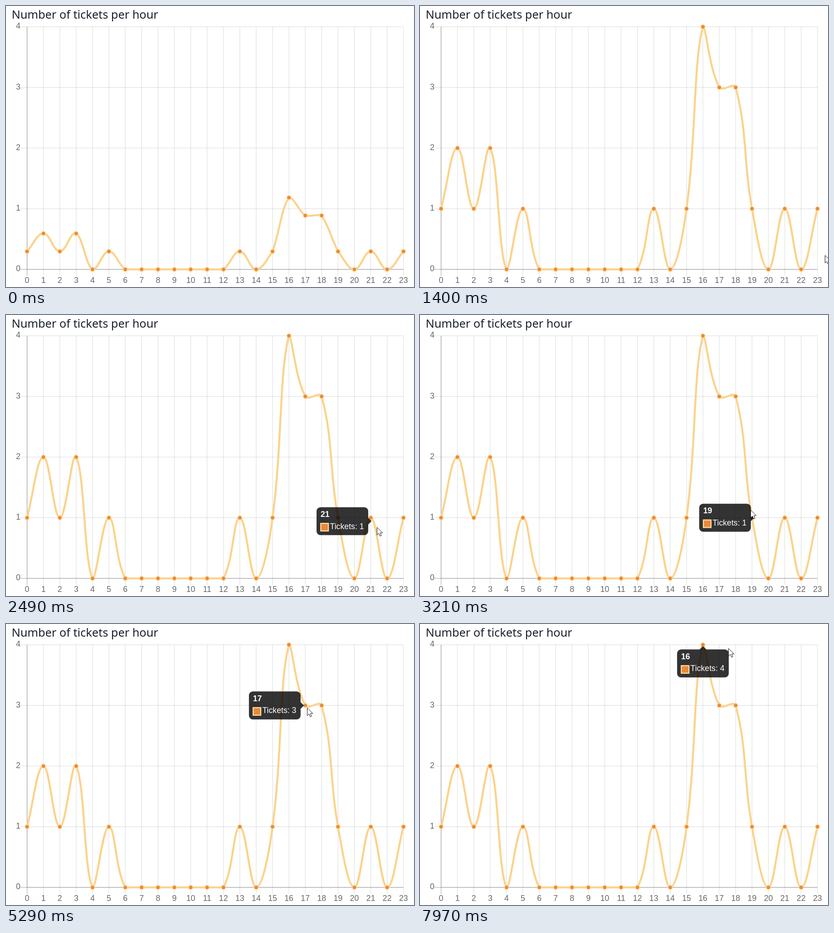
An HTML page with a canvas for the animation above (8 s loop, 900 by 622 pixels).

```html
<!DOCTYPE html>
<html lang="en">
<head>
<meta charset="utf-8">
<title>Tickets per hour</title>
<style>
  html, body { margin: 0; width: 100%; height: 100%; overflow: hidden; background: #fff; }
  canvas { display: block; }
</style>
</head>
<body>
<canvas id="stage" width="900" height="622"></canvas>
<script>
const ctx = document.getElementById('stage').getContext('2d');
const LOOP = 8000;
const UNIT = 1.475;               // one chart pixel on the stage
const FONT = 12 * UNIT;
const SANS = '"Liberation Sans", Arial, sans-serif';
const LINE = '#fbd38d', DOT = '#ed8936';

const values = [1, 2, 1, 2, 0, 1, 0, 0, 0, 0, 0, 0, 0, 1, 0, 1, 4, 3, 3, 1, 0, 1, 0, 1];
const LEFT = 46.5, TOP = 46, STEP = 36.1, BOTTOM = 583, ROW = (BOTTOM - TOP) / 4;
const RIGHT = LEFT + 23 * STEP;
const points = values.map((v, i) => ({ x: LEFT + i * STEP, y: BOTTOM - v * ROW }));

const clamp = (v, lo, hi) => Math.min(hi, Math.max(lo, v));
const lerp = (a, b, k) => a + (b - a) * k;
const easeOutQuart = p => 1 - (1 - clamp(p, 0, 1)) ** 4;

// Control points of a spline with tension 0.4, kept inside the plot.
function handles(pts) {
  return pts.map((p, i) => {
    const prev = pts[Math.max(0, i - 1)], next = pts[Math.min(pts.length - 1, i + 1)];
    const before = Math.hypot(p.x - prev.x, p.y - prev.y);
    const after = Math.hypot(next.x - p.x, next.y - p.y);
    const at = k => ({
      x: clamp(p.x + k * (next.x - prev.x), LEFT, RIGHT),
      y: clamp(p.y + k * (next.y - prev.y), TOP, BOTTOM)
    });
    return { into: at(-0.4 * before / (before + after)), out: at(0.4 * after / (before + after)) };
  });
}
const flatHandles = handles(points.map(p => ({ x: p.x, y: BOTTOM })));
const fullHandles = handles(points);

// Tooltip stops: start time, hovered hour, side on which the arrow sits.
const BOX_W = 114, BOX_H = 42 * UNIT, GAP = 7 * UNIT, CARET = 5 * UNIT, RADIUS = 6 * UNIT;
const stops = [
  [1410, 22, 'bottom'], [2305, 21, 'right'], [3040, 19, 'right'],
  [3810, 18, 'right'], [4480, 17, 'right'], [5610, 16, 'top']
].map(([start, hour, side]) => {
  const p = points[hour];
  const place = {
    bottom: [p.x - BOX_W + 8 * UNIT, p.y - BOX_H - GAP],
    right: [p.x - BOX_W - GAP, p.y - BOX_H / 2],
    top: [p.x - BOX_W / 2, p.y + GAP]
  }[side];
  return { start, hour, side, x: place[0], y: place[1] };
});

// Pointer path: time, x, y.
const path = [
  [1400, 893, 552], [1850, 860, 520], [2130, 860, 520], [2305, 850, 508], [2490, 818, 470],
  [2570, 812, 465], [2920, 795, 455], [3040, 768, 446], [3210, 729, 432], [3290, 724, 415],
  [3730, 712, 331], [3790, 710, 318], [4240, 693, 205], [4480, 678, 194], [4550, 664, 186],
  [5290, 664, 186], [5610, 642, 112], [5900, 628, 57.5], [7700, 628, 57.5], [7970, 680, 54]
];

function text(str, x, y, align, color, weight = '') {
  ctx.font = `${weight} ${FONT}px ${SANS}`;
  ctx.textAlign = align;
  ctx.textBaseline = 'middle';
  ctx.fillStyle = color;
  ctx.fillText(str, x, y);
}

function segment(x1, y1, x2, y2, alpha) {
  ctx.strokeStyle = `rgba(0,0,0,${alpha})`;
  ctx.lineWidth = UNIT;
  ctx.beginPath();
  ctx.moveTo(x1, y1);
  ctx.lineTo(x2, y2);
  ctx.stroke();
}

function drawGrid() {
  ctx.font = '500 25.3px "Noto Sans", "Open Sans", sans-serif';
  ctx.textAlign = 'left';
  ctx.textBaseline = 'alphabetic';
  ctx.fillStyle = '#1a202c';
  ctx.fillText('Number of tickets per hour', 12.5, 28);

  const tick = 10 * UNIT;
  points.forEach((p, i) => {
    segment(p.x, TOP, p.x, BOTTOM + tick, i ? 0.1 : 0.25);
    text(i, p.x, 607.8, 'center', '#666');
  });
  for (let v = 0; v <= 4; v++) {
    const y = BOTTOM - v * ROW;
    segment(LEFT - tick, y, RIGHT, y, v ? 0.1 : 0.25);
    text(v, LEFT - tick, y - 0.5, 'right', '#666');
  }
  segment(LEFT, TOP, LEFT, BOTTOM, 0.1);
  segment(LEFT, BOTTOM, RIGHT, BOTTOM, 0.1);
}

function drawSeries(t) {
  const grow = easeOutQuart((t + 83) / 1000);
  const rise = y => lerp(BOTTOM, y, grow);
  const handle = (i, side) => [
    lerp(flatHandles[i][side].x, fullHandles[i][side].x, grow),
    rise(fullHandles[i][side].y)
  ];
  ctx.strokeStyle = LINE;
  ctx.lineWidth = 3 * UNIT;
  ctx.beginPath();
  points.forEach((p, i) => {
    if (i) ctx.bezierCurveTo(...handle(i - 1, 'out'), ...handle(i, 'into'), p.x, rise(p.y));
    else ctx.moveTo(p.x, rise(p.y));
  });
  ctx.stroke();

  ctx.fillStyle = DOT;
  ctx.lineWidth = UNIT;
  for (const p of points) {
    ctx.beginPath();
    ctx.arc(p.x, rise(p.y), 3 * UNIT, 0, 2 * Math.PI);
    ctx.fill();
    ctx.stroke();
  }
}

function drawTooltip(t) {
  const index = stops.findLastIndex(s => t >= s.start);
  if (index < 0) return;
  const stop = stops[index], from = stops[Math.max(0, index - 1)];
  const k = easeOutQuart((t - stop.start) / 400);
  const x = lerp(from.x, stop.x, k), y = lerp(from.y, stop.y, k);

  ctx.save();
  ctx.globalAlpha = index ? 1 : k;
  ctx.translate(x, y);
  ctx.fillStyle = 'rgba(0,0,0,0.8)';
  ctx.beginPath();
  ctx.roundRect(0, 0, BOX_W, BOX_H, RADIUS);
  const [cx, cy, dx, dy] = {
    bottom: [BOX_W - RADIUS - CARET, BOX_H, 0, 1],
    right: [BOX_W, BOX_H / 2, 1, 0],
    top: [BOX_W / 2, 0, 0, -1]
  }[stop.side];
  ctx.moveTo(cx + dy * CARET, cy - dx * CARET);
  ctx.lineTo(cx + dx * CARET, cy + dy * CARET);
  ctx.lineTo(cx - dy * CARET, cy + dx * CARET);
  ctx.fill();

  const pad = 6 * UNIT, bodyY = 24 * UNIT;
  text(stop.hour, pad, pad + FONT / 2 - 1, 'left', '#fff', 'bold');
  ctx.fillStyle = '#fff';
  ctx.fillRect(pad, bodyY, FONT, FONT);
  ctx.strokeStyle = LINE;
  ctx.lineWidth = UNIT;
  ctx.strokeRect(pad, bodyY, FONT, FONT);
  ctx.fillStyle = DOT;
  ctx.fillRect(pad + UNIT, bodyY + UNIT, 10 * UNIT, 10 * UNIT);
  text(`Tickets: ${values[stop.hour]}`, pad + 14 * UNIT, bodyY + FONT / 2 - 1, 'left', '#fff');
  ctx.restore();
}

const arrow = new Path2D('M0 0V17L4 13.4L6.6 19.6L9.5 18.4L7 12.3H12.3Z');

function drawPointer(t) {
  const i = path.findLastIndex(key => t >= key[0]);
  if (i < 0) return;
  const a = path[i], b = path[i + 1] || a;
  const k = a === b ? 0 : (t - a[0]) / (b[0] - a[0]);
  ctx.save();
  ctx.translate(lerp(a[1], b[1], k) + 0.5, lerp(a[2], b[2], k));
  ctx.fillStyle = '#fff';
  ctx.strokeStyle = '#111';
  ctx.lineWidth = 1;
  ctx.fill(arrow);
  ctx.stroke(arrow);
  ctx.restore();
}

const began = performance.now();
function draw() {
  const t = (performance.now() - began) % LOOP;
  ctx.fillStyle = '#fff';
  ctx.fillRect(0, 0, 900, 622);
  drawGrid();
  drawSeries(t);
  drawTooltip(t);
  drawPointer(t);
  requestAnimationFrame(draw);
}
draw();
</script>
</body>
</html>
```
